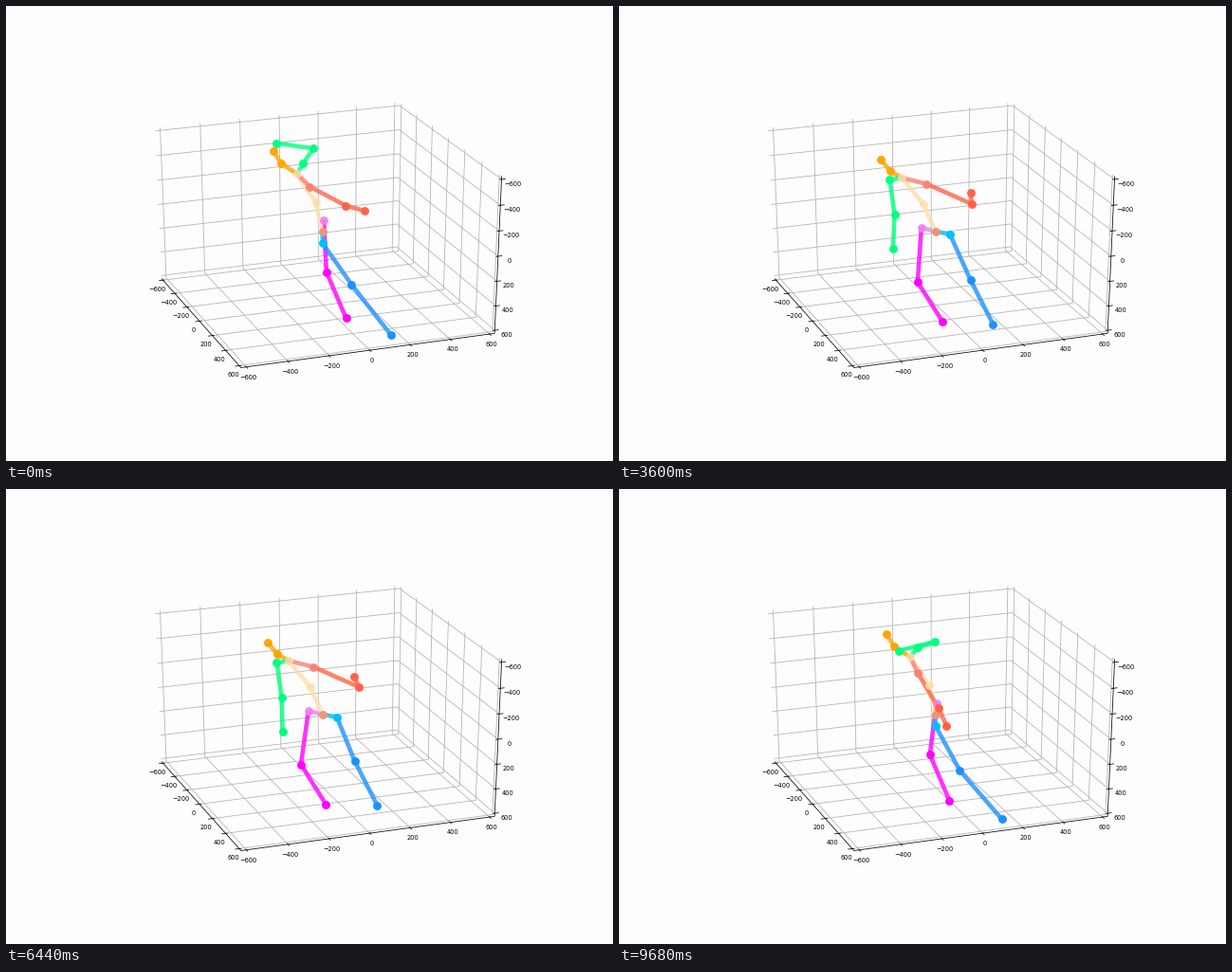
A matplotlib script that plays this animation: 640x480 px, repeating every 9.72 s.

```python
import math

import matplotlib.pyplot as plt
import numpy as np
from matplotlib.animation import FuncAnimation

W, H, DPI = 640, 480, 100
STEP, COUNT = 40, 243

fig = plt.figure(figsize=(W / DPI, H / DPI), dpi=DPI, facecolor="#fdfdfd")
ax = fig.add_axes([0, 0, 1, 1])
ax.set_xlim(0, W)
ax.set_ylim(H, 0)
ax.axis("off")

# ---- static 3D box ----
TURN, TILT = math.radians(20), math.radians(26)
EDGE = 25 / 48
Z_SCALE = 0.868
CAMERA = 10


def project(x, y, z):
    """Box coordinates (z pointing down) to pixels."""
    ct, st = math.cos(TURN), math.sin(TURN)
    ce, se = math.cos(TILT), math.sin(TILT)
    up = -z * Z_SCALE
    depth = y * ct - x * st
    right = x * ct + y * st
    rise = up * ce - depth * se
    f = CAMERA / (CAMERA - depth * ce - up * se)
    return 334.7 + 268.1 * right * f, 236 - 199.8 * rise * f


def path(points, color, order):
    xs, ys = zip(*(project(*p) for p in points))
    ax.plot(xs, ys, color=color, lw=0.55, zorder=order,
            solid_capstyle="butt")


def label(value, point, shift):
    x, y = project(*point)
    text = str(value).replace("-", "\u2212")
    ax.text(x + shift[0], y + shift[1], text, fontsize=4.8, color="black",
            family="DejaVu Sans", ha="center", va="center")


E = EDGE
IN, OUT = E - 0.009, E + 0.017
for value in range(-600, 601, 200):
    v = value / 1200
    path([(v, E, E), (v, -E, E), (v, -E, -E)], "#b0b0b0", 1)
    path([(-E, v, E), (E, v, E), (E, v, -E)], "#b0b0b0", 1)
    path([(-E, -E, v), (E, -E, v), (E, E, v)], "#b0b0b0", 1)
    path([(v, IN, E), (v, OUT, E)], "black", 2)
    path([(-IN, v, E), (-OUT, v, E)], "black", 2)
    path([(IN, E, v), (OUT, E, v)], "black", 2)
    label(value, (v, E, E), (2.4, 10.8))
    label(value, (-E, v, E), (-6.5, 9.8))
    label(value, (E, E, v), (12.2, 5))

path([(-E, -E, E), (-E, E, E), (E, E, E), (E, E, -E)], "black", 2)

# ---- motion ----
t = np.arange(COUNT) * STEP / 1000


def ease(start, end):
    u = np.clip((t - start) / (end - start), 0, 1)
    return u * u * (3 - 2 * u)


back = ease(9, 9.7)
front = ease(2.7, 3.3) - back              # 0 side view, 1 front view
lift_a = 1 - ease(1.3, 2.5) + 0.65 * back  # right arm and left leg
lift_b = 1 - ease(0, 2.2) + 0.25 * back    # left arm and right leg
lunge = np.exp(-((t - 4.4) / 0.6) ** 2)

joints = {"root": (None, "darksalmon", np.full((COUNT, 2), (333.5, 237.5)))}


def mix(a, b, w):
    return a + (b - a) * w


def bone(name, parent, color, length, angle, lift=0, raised=0,
         swing=0, stretch=0):
    """Add a joint; length and angle are (side view, front view)."""
    size = mix(*length, front) + stretch * lunge
    turn = mix(angle[0] + raised * lift, angle[1], front) + swing * lunge
    a = np.radians(turn)
    step = np.column_stack([size * np.cos(a), size * np.sin(a)])
    joints[name] = (parent, color, joints[parent][2] + step)


bone("r hip", "root", "violet", (12, 15), (-83, -167))
bone("r knee", "r hip", "fuchsia", (55, 57), (101, 98),
     lift_b, -14, swing=-23)
bone("r foot", "r knee", "fuchsia", (53, 50), (67, 58))
bone("l hip", "root", "deepskyblue", (13, 16), (88, 13))
bone("l knee", "l hip", "dodgerblue", (53, 50), (73, 68),
     lift_a, -18, swing=-13, stretch=18)
bone("l foot", "l knee", "dodgerblue", (68, 52), (44, 63), lift_a, 8)

bone("spine", "root", "navajowhite", (31, 31), (-103, -114))
bone("chest", "spine", "navajowhite", (36, 36), (-123, -129))
bone("neck", "chest", "orange", (20, 14), (-147, -150))
bone("head", "neck", "orange", (15.5, 15.5), (-122, -130))

bone("l shoulder", "chest", "salmon", (19, 27), (71, 14), lift_b, -26)
bone("l elbow", "l shoulder", "tomato", (43, 52), (70, 24), lift_b, -42)
bone("l wrist", "l elbow", "tomato", (20, 12), (83, -112),
     lift_b, -68, swing=95)
bone("r shoulder", "chest", "springgreen", (13, 13), (-30, -190),
     lift_a, -30)
bone("r elbow", "r shoulder", "springgreen", (19, 37), (47, 82),
     lift_a, -102)
bone("r wrist", "r elbow", "springgreen", (40, 36), (126, 88),
     lift_a, 62, swing=28)

# pale joints are partly see-through
FADE = {"violet": 0.9, "navajowhite": 0.8, "salmon": 0.9}

lines, dots = [], []
for parent, color, track in joints.values():
    if parent:
        line, = ax.plot([], [], color=color, lw=3.3, alpha=0.8, zorder=4,
                        solid_capstyle="butt")
        lines.append((line, joints[parent][2], track))
    dot, = ax.plot([], [], "o", color=color, ms=6.4, mew=0, zorder=5,
                   alpha=FADE.get(color, 1))
    dots.append((dot, track))


def draw(i):
    for line, a, b in lines:
        line.set_data([a[i, 0], b[i, 0]], [a[i, 1], b[i, 1]])
    for dot, track in dots:
        dot.set_data([track[i, 0]], [track[i, 1]])
    return [line[0] for line in lines] + [dot[0] for dot in dots]


anim = FuncAnimation(fig, draw, frames=COUNT, interval=STEP,
                     repeat=True, repeat_delay=0, blit=False)
plt.show()
```
